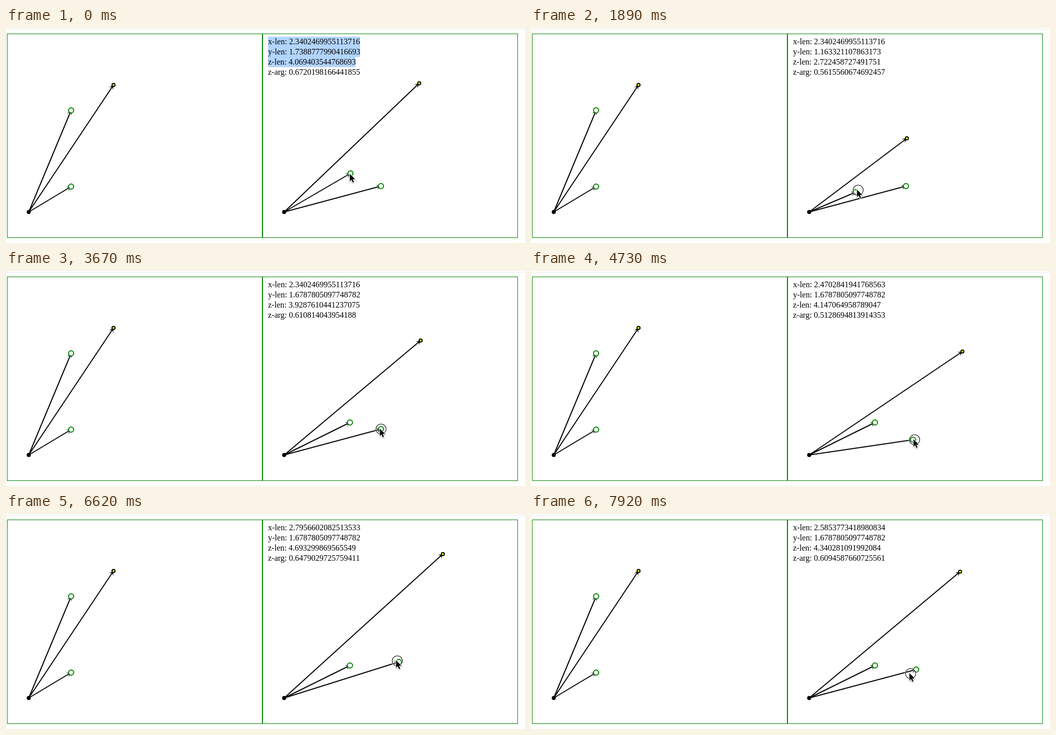
Write an HTML page with a canvas that moves like this. It is 1020 by 423 pixels and loops after 8 s.

```html
<!DOCTYPE html>
<html lang="en">
<head>
<meta charset="utf-8">
<title>Complex product</title>
<style>
html, body { margin: 0; width: 100%; height: 100%; overflow: hidden; background: #fff; }
canvas { display: block; }
</style>
</head>
<body>
<canvas id="stage" width="1020" height="423"></canvas>
<script>
const ctx = document.getElementById('stage').getContext('2d');
const LOOP = 8000, STEP = 118.2, STEP_LEAD = 14;
const LEFT = 3, RIGHT = 505, TOP = 12;
const RELEASE = 27, GRAB = 31;          // steps: y is let go, x is picked up
const Y_END = [676, 298], X_START = [737, 311];

// Key points of the pointer: step, position.
const path = [
  [0, 677, 286], [2, 679, 289], [9, 639, 326], [14, 628, 330], [23, 673, 297],
  [24, ...Y_END], [RELEASE, ...Y_END], [GRAB + 1, ...X_START], [36, ...X_START],
  [40, 751, 332], [47, 773, 334], [56, 772, 291], [59, 764, 284],
  [67, 757, 306], [68, 746, 314]
];

function pointAt(n) {
  const i = Math.max(1, path.findIndex(p => p[0] >= n));
  const [n0, x0, y0] = path[i - 1], [n1, x1, y1] = path[i];
  const k = (n - n0) / (n1 - n0);
  return [x0 + (x1 - x0) * k, y0 + (y1 - y0) * k].map(Math.round);
}

// The plane spans -0.5 to 5.5 across 500 px and -0.5 to 3.5 up 400 px.
const toPlane = ([px, py]) => [-0.5 + 6 * ((px - RIGHT) / 500), 3.5 - 4 * ((py - TOP) / 400)];
const toPixel = (left, [a, b]) => [left + (a + 0.5) * 500 / 6, TOP + (3.5 - b) * 100];
const add = (p, q) => [p[0] + q[0], p[1] + q[1]];
const multiply = (p, q) => [p[0] * q[0] - p[1] * q[1], p[0] * q[1] + p[1] * q[0]];
const size = p => Math.sqrt(p[0] * p[0] + p[1] * p[1]);

function polygon(points) {
  ctx.beginPath();
  points.forEach(p => ctx.lineTo(...p));
  ctx.closePath();
}

function circle([x, y], r, fill, stroke, width = 2) {
  ctx.beginPath();
  ctx.arc(x, y, r, 0, 2 * Math.PI);
  if (fill) { ctx.fillStyle = fill; ctx.fill(); }
  if (stroke) { ctx.strokeStyle = stroke; ctx.lineWidth = width; ctx.stroke(); }
}

function arrow([x0, y0], [x1, y1]) {
  ctx.strokeStyle = ctx.fillStyle = '#000';
  ctx.lineWidth = 2;
  ctx.beginPath();
  ctx.moveTo(x0, y0);
  ctx.lineTo(x1, y1);
  ctx.stroke();
  ctx.save();
  ctx.translate(x1, y1);
  ctx.rotate(Math.atan2(y1 - y0, x1 - x0));
  polygon([[0, 0], [-8.8, -4.8], [-4.6, 0], [-8.8, 4.8]]);
  ctx.fill();
  ctx.restore();
}

function panel(left, x, y, z) {
  ctx.strokeStyle = 'green';
  ctx.lineWidth = 1;
  ctx.strokeRect(left - 0.5, TOP - 0.5, 501, 401);
  const origin = toPixel(left, [0, 0]);
  const tips = [x, y, z].map(p => toPixel(left, p));
  tips.forEach(tip => arrow(origin, tip));
  circle(origin, 4, '#000');
  circle(tips[0], 5, '#fff', 'green');
  circle(tips[1], 5, '#fff', 'green');
  circle(tips[2], 3, '#ff0', '#000');
}

function readout(x, y, z, selected) {
  ctx.font = '16px "Liberation Serif", "Times New Roman", serif';
  const lines = [
    'x-len: ' + size(x), 'y-len: ' + size(y), 'z-len: ' + size(z),
    'z-arg: ' + Math.atan2(z[1], z[0])
  ];
  lines.forEach((line, i) => {
    if (selected && i < 3) {
      ctx.fillStyle = '#b2d5ff';
      ctx.fillRect(515, 17 + 20 * i, Math.round(ctx.measureText(line).width), 20);
    }
    ctx.fillStyle = '#000';
    ctx.fillText(line, 515, 32 + 20 * i);
  });
}

function pointer([x, y], pressed) {
  if (pressed) {
    circle([x, y], 10, null, 'rgba(255,255,255,.6)', 3);
    circle([x, y], 10, null, '#000', 1.1);
  }
  ctx.save();
  ctx.translate(x - 2.3, y - 1);
  polygon([[0, 0], [0, 14.5], [3.3, 11.4], [5.6, 17], [8, 16], [5.7, 10.6], [10.4, 10.6]]);
  ctx.shadowColor = 'rgba(0,0,0,.4)';
  ctx.shadowBlur = 2;
  ctx.shadowOffsetY = 1;
  ctx.strokeStyle = '#fff';
  ctx.lineWidth = 2;
  ctx.stroke();
  ctx.shadowColor = 'transparent';
  ctx.fillStyle = '#000';
  ctx.fill();
  ctx.restore();
}

function draw() {
  const n = Math.floor((performance.now() % LOOP + STEP_LEAD) / STEP);
  const x = toPlane(n > GRAB ? pointAt(n) : X_START);
  const y = toPlane(n < RELEASE ? pointAt(n) : Y_END);

  ctx.fillStyle = '#fff';
  ctx.fillRect(0, 0, 1020, 423);
  ctx.fillStyle = '#e6e6e6';
  ctx.fillRect(0, 2, 1020, 1);
  const p = [1, 0.5], q = [1, 2], z = multiply(x, y);
  panel(LEFT, p, q, add(p, q));
  panel(RIGHT, x, y, z);
  readout(x, y, z, n === 0);
  // The dragged handle trails the pointer by one step.
  pointer(pointAt(n + 1), n > 0 && (n < RELEASE || n >= GRAB));
  requestAnimationFrame(draw);
}
draw();
</script>
</body>
</html>
```
